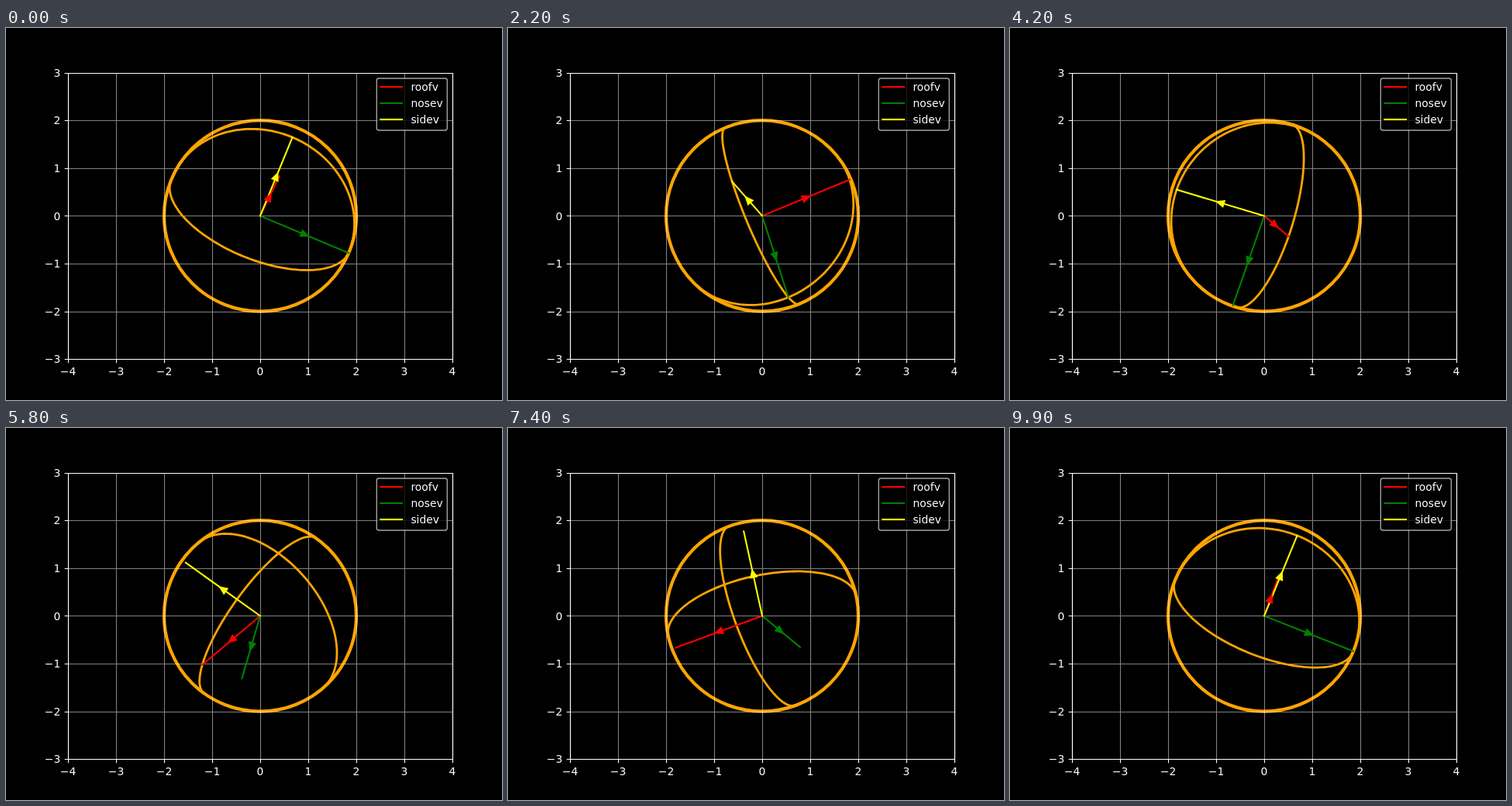
These frames come from a looping animation (640 by 480 pixels, 10 s). An HTML page:

```html
<!DOCTYPE html>
<html lang="en">
<head>
<meta charset="utf-8">
<title>Rotating ball</title>
<style>
  html, body { margin: 0; width: 100%; height: 100%; overflow: hidden; background: #000; }
  svg { display: block; width: 640px; height: 480px; }
  text { font: 13.89px "DejaVu Sans", sans-serif; fill: #fff; }
</style>
</head>
<body>
<svg id="stage" viewBox="0 0 640 480"></svg>
<script>
const stage = document.getElementById('stage');
const LOOP = 10000, STEP = 100;
const LINE = 2.083;
const BOX = { left: 80, right: 576, top: 57.6, bottom: 427.2 };
const px = x => 328 + 62 * x;
const py = y => 242.4 - 61.6 * y;
const snap = v => Math.floor(v + 0.5) + 0.5;

function add(tag, attrs, text) {
  const node = document.createElementNS('http://www.w3.org/2000/svg', tag);
  for (const key in attrs) node.setAttribute(key, attrs[key]);
  if (text !== undefined) node.textContent = text;
  return stage.appendChild(node);
}
const stroke = (d, color, width, extra) =>
  add('path', { d, fill: 'none', stroke: color, 'stroke-width': width, ...extra });
const label = (x, y, text, anchor) => add('text', { x, y, 'text-anchor': anchor }, text);
const signed = n => String(n).replace('-', '\u2212');

// Axes, grid and ball outline
add('rect', { width: 640, height: 480, fill: '#000' });
add('ellipse', { cx: px(0), cy: py(0), rx: 124, ry: 123.2, fill: 'none', stroke: '#ffa500', 'stroke-width': 4.167 });

const left = snap(BOX.left), right = snap(BOX.right);
const top_ = snap(BOX.top), bottom = snap(BOX.bottom);
let grid = '', ticks = '';
for (let x = -4; x <= 4; x++) {
  const at = snap(px(x));
  grid += `M${at} ${top_}V${bottom}`;
  ticks += `M${at} ${bottom}v4.86`;
  label(px(x), 448, signed(x), 'middle');
}
for (let y = -3; y <= 3; y++) {
  const at = snap(py(y));
  grid += `M${left} ${at}H${right}`;
  ticks += `M${left} ${at}h-4.86`;
  label(70.3, Math.round(py(y) + 5.2), signed(y), 'end');
}
stroke(grid, '#fff', 1.11, { 'stroke-opacity': 0.5 });

// Moving parts
const seams = [0, 1].map(() => stroke('', '#ffa500', 2.778, { 'stroke-linecap': 'square', 'stroke-linejoin': 'round' }));
const vectors = [['roofv', '#f00'], ['nosev', '#008000'], ['sidev', '#ff0']]
  .map(([name, color]) => ({ name, color, line: stroke('', color, LINE, { 'stroke-linecap': 'square' }) }));

stroke(ticks, '#fff', 1.11);
stroke(`M${left} ${top_}H${right}V${bottom}H${left}Z`, '#fff', 1.11, { 'stroke-linejoin': 'miter' });

for (const v of vectors) v.head = add('path', { fill: v.color });

// Legend
add('rect', { x: 478.3, y: 65, width: 91, height: 67, rx: 2.8, fill: '#000', 'fill-opacity': 0.8,
  stroke: '#ccc', 'stroke-opacity': 0.8, 'stroke-width': 1.389 });
vectors.forEach((v, i) => {
  const y = 76 + 21 * i;
  stroke(`M483.3 ${y}H511`, v.color, LINE, { 'stroke-linecap': 'square' });
  label(522.4, y + 5, v.name, 'start');
});

// Orthonormal frame: the ball spins about `axis`, seen with z towards the viewer
const mix = (a, ka, b, kb) => a.map((v, i) => v * ka + b[i] * kb);
const cross = (a, b) => [0, 1, 2].map(i => a[(i + 1) % 3] * b[(i + 2) % 3] - a[(i + 2) % 3] * b[(i + 1) % 3]);
const { sin, cos, PI, SQRT2 } = Math;
const tilt = 0.2, turn = 0.4363;
const first = [sin(tilt), cos(tilt) * sin(turn), -cos(tilt) * cos(turn)];
const second = [
  cos(tilt) * cos(turn),
  sin(turn) * cos(turn) * (1 - sin(tilt)),
  sin(turn) ** 2 + sin(tilt) * cos(turn) ** 2
];
const axis = cross(first, second);

// Front half of the great circle through a and b
function seamPath(a, b) {
  const mid = Math.atan2(b[2], a[2]);
  const points = [];
  for (let k = 0; k <= 80; k++) {
    const t = mid + PI * (k / 80 - 0.5);
    const p = mix(a, 2 * cos(t), b, 2 * sin(t));
    points.push(`${px(p[0]).toFixed(2)} ${py(p[1]).toFixed(2)}`);
  }
  return 'M' + points.join('L');
}

function drawVector(v, dir) {
  const dx = px(2 * dir[0]) - px(0), dy = py(2 * dir[1]) - py(0);
  const length = Math.hypot(dx, dy), ux = dx / length, uy = dy / length;
  const at = (along, across) =>
    `${(px(0) + ux * along - uy * across).toFixed(2)} ${(py(0) + uy * along + ux * across).toFixed(2)}`;
  const tip = length * 0.535 + 3;
  v.line.setAttribute('d', `M${at(0, 0)}L${at(length, 0)}`);
  v.head.setAttribute('d', `M${at(tip, 0)}L${at(tip - 12.4, 5.3)}L${at(tip - 12.4, -5.3)}Z`);
}

function render(time) {
  const angle = 2 * PI * Math.floor((time % LOOP) / STEP) * STEP / LOOP;
  const roof = mix(first, cos(angle), second, sin(angle));
  const flank = mix(second, cos(angle), first, -sin(angle));
  const nose = mix(flank, 1 / SQRT2, axis, 1 / SQRT2);
  const side = mix(flank, 1 / SQRT2, axis, -1 / SQRT2);
  seams[0].setAttribute('d', seamPath(nose, side));
  seams[1].setAttribute('d', seamPath(nose, roof));
  [roof, nose, side].forEach((dir, i) => drawVector(vectors[i], dir));
}

const start = performance.now();
function tick() {
  render(performance.now() - start);
  requestAnimationFrame(tick);
}
tick();
</script>
</body>
</html>
```
